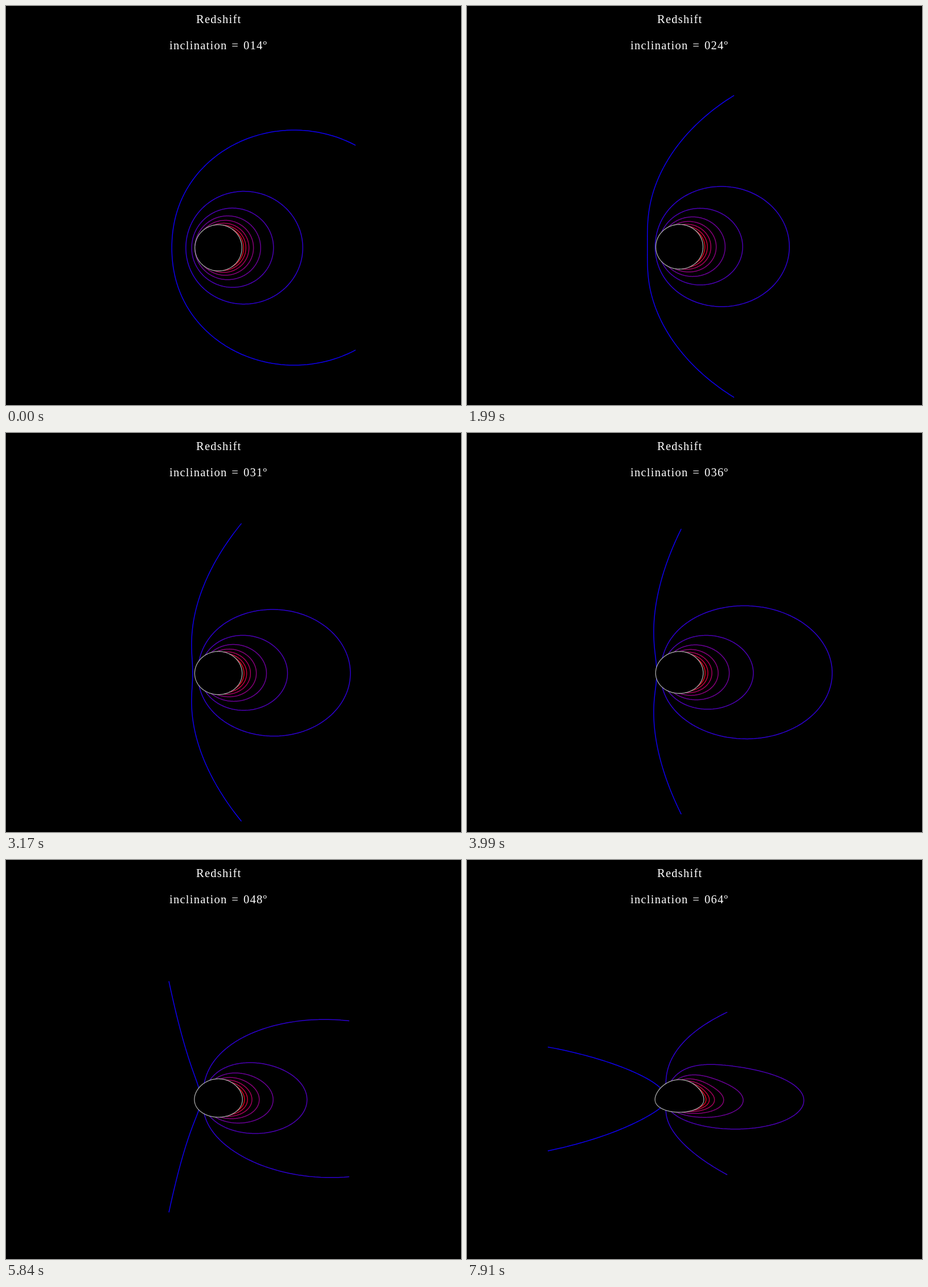
Recreate the animation shown at these times as an HTML page with a canvas. Size 799x701 px, loop 8 s.

```html
<!DOCTYPE html>
<html lang="en">
<head>
<meta charset="utf-8">
<title>Redshift</title>
<style>
  html, body { margin: 0; width: 100%; height: 100%; overflow: hidden; background: #000; }
  canvas { position: absolute; left: 0; top: 0; }
  p {
    position: absolute; margin: 0; color: #fff; white-space: pre;
    font: 20.5px/24px "Liberation Serif", "Times New Roman", serif;
    letter-spacing: 1.25px; word-spacing: 1.5px;
  }
  #title { left: 334px; top: 11px; }
  #label { left: 287px; top: 57px; }
</style>
</head>
<body>
<canvas id="stage" width="799" height="701"></canvas>
<p id="title">Redshift</p>
<p id="label"></p>
<script>
// Contours of redshift on a thin disc around a Schwarzschild black hole (lengths in units of M).
const LOOP = 8000, FIRST_DEG = 14;
const CX = 373, CY = 427.4, SCALE = 5.95;
const R_IN = 6, R_OUT = 50, ROWS = 64, COLS = 240, BANDS = 9;
const RAD = Math.PI / 180, B_STEP = 0.2, B_COUNT = 285, MAX_PSI = 160;

const stage = document.getElementById('stage');
const ctx = stage.getContext('2d');
const label = document.getElementById('label');
const radii = Array.from({ length: ROWS + 1 }, (_, j) => R_IN * (R_OUT / R_IN) ** (j / ROWS));

// 1/r along one light ray, sampled at every degree swept from the observer.
function traceRay(b) {
  const h = RAD / 4, bend = u => 3 * u * u - u, samples = [0];
  let u = 0, v = 1 / b;
  for (let deg = 1; deg <= MAX_PSI; deg++) {
    for (let n = 0; n < 4 && u < 0.5; n++) {
      const a1 = bend(u), v2 = v + h / 2 * a1;
      const a2 = bend(u + h / 2 * v), v3 = v + h / 2 * a2;
      const a3 = bend(u + h / 2 * v2), v4 = v + h * a3;
      const a4 = bend(u + h * v3);
      u += h / 6 * (v + 2 * v2 + 2 * v3 + v4);
      v += h / 6 * (a1 + 2 * a2 + 2 * a3 + a4);
    }
    samples.push(Math.min(u, 0.5));
  }
  return samples;
}
const rays = Array.from({ length: B_COUNT }, (_, i) => traceRay((i + 1) * B_STEP));

function radiusAt(i, psi) {
  const d = Math.floor(psi), f = psi - d;
  const u = rays[i][d] * (1 - f) + rays[i][d + 1] * f;
  return 1 / Math.max(u, 0.005);
}

// Impact parameters of all grid radii seen at the angle psi (degrees).
function impacts(psi) {
  let i = 0, lo = radiusAt(0, psi), hi = radiusAt(1, psi);
  return radii.map(r => {
    while (hi < r && i < B_COUNT - 2) {
      i++;
      lo = hi;
      hi = radiusAt(i + 1, psi);
    }
    return (i + 1 + (r - lo) / (hi - lo)) * B_STEP;
  });
}

function discColumn(phi, sinI, cosI) {
  const sx = Math.sin(phi), sy = -Math.cos(phi) * cosI, len = Math.hypot(sx, sy);
  const psi = Math.acos(Math.cos(phi) * sinI) / RAD;
  return impacts(psi).map((b, j) => {
    const r = radii[j], dir = sx / len;
    return {
      x: CX + SCALE * b * dir,
      y: CY - SCALE * b * sy / len,
      z: (1 + b * sinI * dir * r ** -1.5) / Math.sqrt(1 - 3 / r)
    };
  });
}

function addCell(path, corners, level) {
  const cuts = [];
  corners.forEach((p, k) => {
    const q = corners[(k + 1) % 4];
    if ((p.z < level) === (q.z < level)) return;
    const f = (level - p.z) / (q.z - p.z);
    cuts.push([p.x + f * (q.x - p.x), p.y + f * (q.y - p.y)]);
  });
  for (let k = 0; k + 1 < cuts.length; k += 2) {
    path.moveTo(...cuts[k]);
    path.lineTo(...cuts[k + 1]);
  }
}

function bandColor(n) {
  const red = Math.round(255 * (n - 0.5) / (BANDS - 0.5));
  return `rgb(${red},0,${255 - red})`;
}

function buildScene(deg) {
  const sinI = Math.sin(deg * RAD), cosI = Math.cos(deg * RAD);
  const grid = Array.from({ length: COLS }, (_, k) => discColumn((k + 0.5) * 2 * Math.PI / COLS, sinI, cosI));
  const zs = grid.flat().map(p => p.z), min = Math.min(...zs), max = Math.max(...zs);
  const lines = [];
  for (let n = 1; n < BANDS; n++) {
    const path = new Path2D(), level = min + (max - min) * n / BANDS;
    grid.forEach((col, k) => {
      const next = grid[(k + 1) % COLS];
      for (let j = 0; j < ROWS; j++) addCell(path, [col[j], col[j + 1], next[j + 1], next[j]], level);
    });
    lines.push({ path, color: bandColor(n) });
  }
  const rim = new Path2D();
  grid.forEach(col => rim.lineTo(col[0].x, col[0].y));
  rim.closePath();
  return { lines, rim };
}

const scenes = {};
function draw(deg) {
  const { lines, rim } = scenes[deg] ??= buildScene(deg);
  ctx.clearRect(0, 0, stage.width, stage.height);
  ctx.lineWidth = 1.5;
  ctx.lineCap = 'round';
  for (const { path, color } of lines) {
    ctx.strokeStyle = color;
    ctx.stroke(path);
  }
  ctx.strokeStyle = '#a8a8a8';
  ctx.lineWidth = 1.3;
  ctx.stroke(rim);
  label.textContent = `inclination = ${String(deg).padStart(3, '0')}º`;
}

// The tilt gains speed slowly and advances in whole degrees.
function inclinationAt(seconds) {
  return FIRST_DEG + Math.floor(0.18 + 4.65 * seconds + 0.2125 * seconds ** 2);
}

let shown;
function tick() {
  const deg = inclinationAt(performance.now() % LOOP / 1000);
  if (deg !== shown) draw(shown = deg);
  requestAnimationFrame(tick);
}
tick();
</script>
</body>
</html>
```
